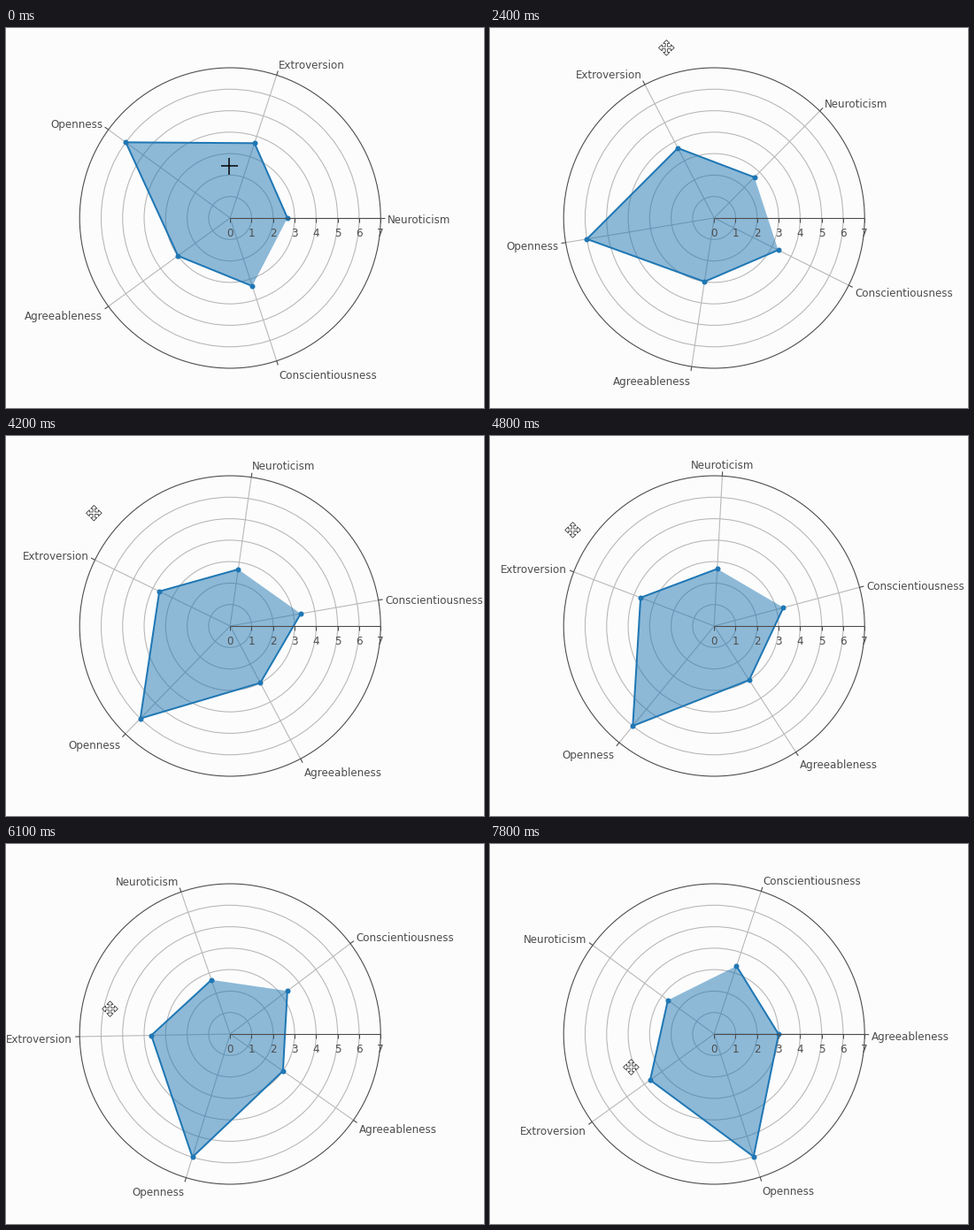
Animation, 540 px wide and 430 px high, one loop 8 s. Source, as a matplotlib script:

```python
import numpy as np
import matplotlib.pyplot as plt
from matplotlib.animation import FuncAnimation
from matplotlib.patches import Circle, Polygon

W, H, DPI = 540, 430, 100
STEP, FRAMES = 100, 80
PX = 72 / DPI  # points per pixel
CX, CY, R, R_MAX = 253.2, 215, 170, 7
UNIT = R / R_MAX
BLUE, DARK, GRID, BG = "#1f77b4", "#4c4c4c", "#b8b8b8", "#fcfcfc"
FONT = dict(family="DejaVu Sans", size=11.85 * PX, color=DARK,
            va="baseline", zorder=6)

TRAITS = ["Neuroticism", "Extroversion", "Openness",
          "Agreeableness", "Conscientiousness"]
SCORES = np.array([8 / 3, 11 / 3, 6, 3, 10 / 3])
BASE = 72 * np.arange(5)

HOVER_END, DRAG_START = 900, 1600
GRAB = 58   # pointer angle where the drag begins
LEAD = 60   # ms by which the pointer runs ahead of the chart
SPIN_TIMES = [DRAG_START, 2400, 3500, 4800, 5200, 6100, 7100, 7800]
SPIN_ANGLES = [0, 45.4, 75.9, 86.9, 94.9, 109, 132.8, 143.8]


def glide(t, times, values):
    """Monotone cubic interpolation, held at both ends."""
    t = np.clip(t, times[0], times[-1])
    h = np.diff(times)
    d = np.diff(values) / h
    inner = 2 * d[:-1] * d[1:] / (d[:-1] + d[1:])
    m = np.concatenate([d[:1], inner, d[-1:]])
    i = min(np.searchsorted(times, t, side="right") - 1, len(h) - 1)
    s = (t - times[i]) / h[i]
    rise = s * s * (3 - 2 * s)
    return (values[i] + rise * (values[i + 1] - values[i])
            + s * (1 - s) * h[i] * ((1 - s) * m[i] - s * m[i + 1]))


def spin(t):
    return glide(t, SPIN_TIMES, SPIN_ANGLES)


def polar(r, deg):
    a = np.radians(deg)
    return CX + r * np.cos(a), CY - r * np.sin(a)


def pointer(t):
    if t < DRAG_START:
        # dip through the chart, then up to the rim
        s = min(t / HOVER_END, 1)
        path = np.array([(252, 156), (205, 300), (235, 180),
                         polar(196, GRAB)])
        weights = [(1 - s) ** 3, 3 * s * (1 - s) ** 2,
                   3 * s * s * (1 - s), s ** 3]
        return weights @ path
    s = np.clip((t - 4300) / 3100, 0, 1)
    radius = 200 - 99 * s * s * (3 - 2 * s)
    return polar(radius, GRAB + spin(t + LEAD))


def move_shape():
    arm = np.array([(1.2, 1.2), (1.2, 5), (3.6, 5), (0, 8.8),
                    (-3.6, 5), (-1.2, 5)])
    turns = []
    for k in range(4):
        c, s = np.cos(k * np.pi / 2), np.sin(k * np.pi / 2)
        turns.append(arm @ np.array([(c, s), (-s, c)]))
    return np.vstack(turns)


fig = plt.figure(figsize=(W / DPI, H / DPI), dpi=DPI, facecolor=BG)
ax = fig.add_axes([0, 0, 1, 1])
ax.set_xlim(0, W)
ax.set_ylim(H, 0)
ax.axis("off")


def stroke(x, y, color, width, z, **kw):
    return ax.plot(x, y, color=color, lw=width * PX, zorder=z,
                   solid_capstyle="butt", **kw)[0]


# grid and outer rim
for n in range(1, R_MAX + 1):
    rim = n == R_MAX
    ax.add_patch(Circle((CX, CY), n * UNIT, fill=False, lw=1.1 * PX,
                        ec=DARK if rim else GRID, zorder=4 if rim else 1))

# radial axis
axis_y = CY - 0.5
stroke([CX, CX + R], [axis_y, axis_y], DARK, 1.1, 5)
for n in range(R_MAX + 1):
    x = CX + n * UNIT
    stroke([x, x], [axis_y, axis_y + 5], DARK, 1, 5)
    ax.text(x, 235.8, str(n), ha="center", **FONT)

spokes = [stroke([], [], GRID, 1.1, 1) for _ in TRAITS]
ticks = [stroke([], [], DARK, 1.1, 4) for _ in TRAITS]
labels = [ax.text(0, 0, name, **FONT) for name in TRAITS]

area = ax.add_patch(Polygon(np.zeros((5, 2)), fc=BLUE, alpha=0.5, lw=0,
                            zorder=2))
line = stroke([], [], BLUE, 2, 3, marker="o", ms=6 * PX, mew=0,
              solid_joinstyle="round")

MOVE = move_shape()
mover = ax.add_patch(Polygon(MOVE, fc="white", ec="#333333", lw=0.8 * PX,
                             zorder=9))
cross = [stroke([], [], "black", 1.5, 9) for _ in range(2)]


def draw(i):
    t = i * STEP
    angles = BASE + spin(t)

    for deg, spoke, tick, label in zip(angles, spokes, ticks, labels):
        spoke.set_data(*polar(np.array([0, R]), deg))
        tick.set_data(*polar(np.array([R, R + 5]), deg))
        c, s = np.cos(np.radians(deg)), np.sin(np.radians(deg))
        x, y = polar(178, deg)
        label.set_position((x, y - 6.8 * s + 6.3))
        label.set_ha("center" if abs(c) < 0.1 else "left" if c > 0
                     else "right")

    xs, ys = polar(SCORES * UNIT, angles)
    line.set_data(xs, ys)
    area.set_xy(np.column_stack([xs, ys]))

    px, py = pointer(t)
    moving = t >= DRAG_START or np.hypot(px - CX, py - CY) > R
    mover.set_visible(moving)
    mover.set_xy(MOVE + (px, py))
    cross[0].set_data([px - 9.5, px + 9.5], [py, py])
    cross[1].set_data([px, px], [py - 9.5, py + 9.5])
    for bar in cross:
        bar.set_visible(not moving)
    return []


anim = FuncAnimation(fig, draw, frames=FRAMES, interval=STEP, repeat=True,
                     repeat_delay=0, init_func=lambda: draw(0))
plt.show()
```
